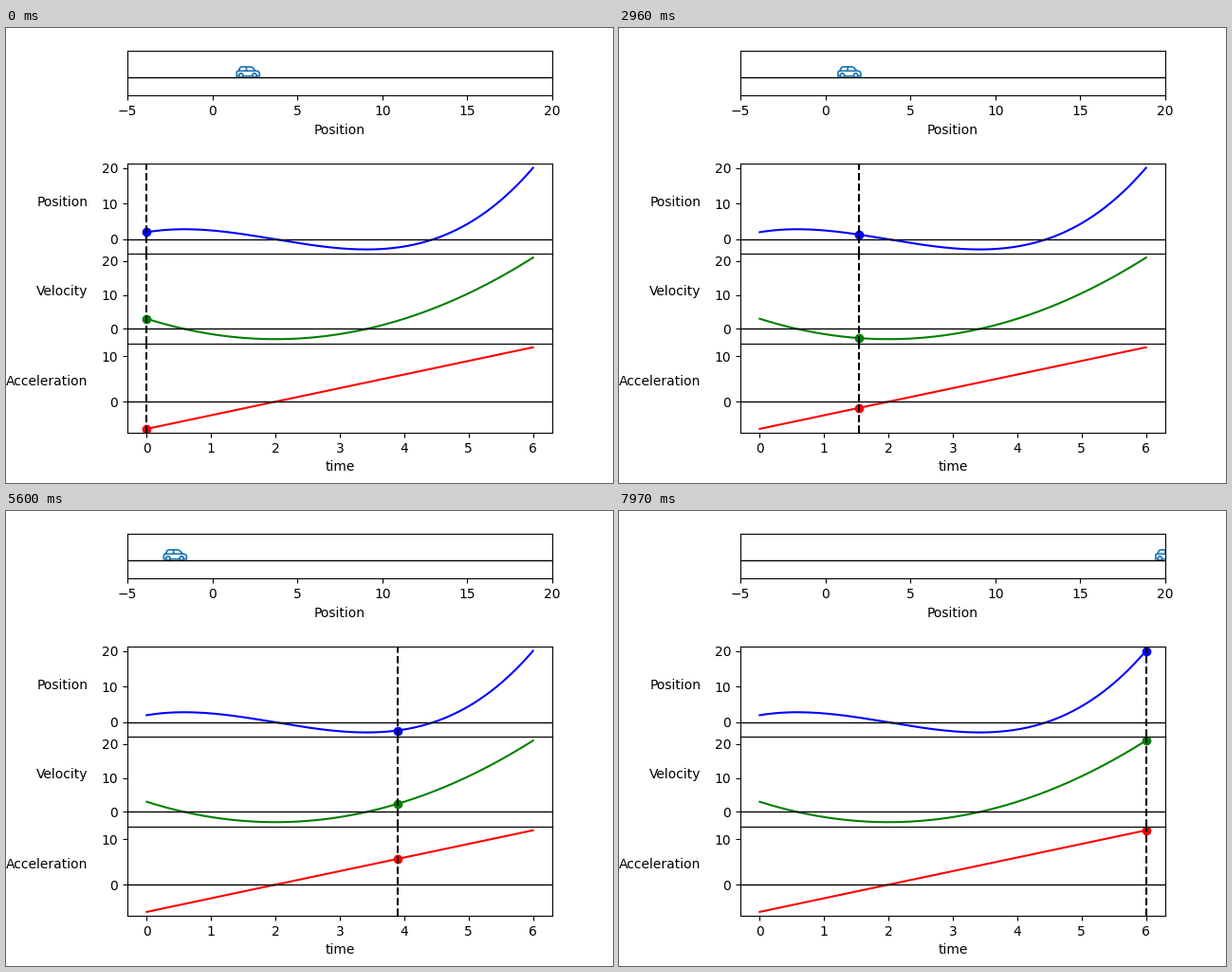
These frames come from a looping animation (640x480 px, 9.22 s). A matplotlib script:

```python
import matplotlib.pyplot as plt
import numpy as np
from matplotlib.animation import FuncAnimation
from matplotlib.patches import PathPatch
from matplotlib.path import Path
from matplotlib.transforms import Affine2D

W, H = 640, 480
STEP_MS, HOLD_MS, POSE_MS, LOOP_MS = 20, 1250, 30, 9220
T_END, POSES = 6, 225


def position(t):
    return 0.5 * t**3 - 3 * t**2 + 3 * t + 2


def velocity(t):
    return 1.5 * t**2 - 6 * t + 3


def acceleration(t):
    return 3 * t - 6


PLOTS = [
    ("Position", position, "b", [0, 10, 20]),
    ("Velocity", velocity, "g", [0, 10, 20]),
    ("Acceleration", acceleration, "r", [0, 10]),
]

plt.rcParams["font.family"] = "DejaVu Sans"
fig = plt.figure(figsize=(W / 100, H / 100), dpi=100)
grid = fig.add_gridspec(5, 1, height_ratios=[1, 1.52, 2, 2, 2], hspace=0,
                        left=0.2, right=0.9, bottom=0.11, top=0.95)
times = np.linspace(0, T_END, POSES + 1)

# Road strip and the three graphs: limits, ticks and labels
road = fig.add_subplot(grid[0])
road.set(xlim=(-5, 20), ylim=(-0.7, 1), yticks=[], xlabel="Position",
         xticks=range(-5, 21, 5))

graphs = []
for row, (name, func, color, ticks) in enumerate(PLOTS, 2):
    ax = fig.add_subplot(grid[row])
    values = func(times)
    pad = 0.05 * np.ptp(values)
    ax.set(xlim=(-0.05 * T_END, 1.05 * T_END), yticks=ticks,
           ylim=(values.min() - pad, values.max() + pad),
           xticks=range(T_END + 1) if row == 4 else [])
    ax.set_ylabel(name, rotation=0, ha="right", labelpad=10)
    graphs.append(ax)
graphs[-1].set_xlabel("time")


def freeze_labels():
    """Render ticks and text once and keep them as still strips, for speed."""
    for ax in fig.axes:
        ax.spines[:].set_visible(False)
    fig.canvas.draw()
    image = np.array(fig.canvas.buffer_rgba())
    for x0, y0, x1, y1 in [(0, 136, 128, 427), (100, 427, 600, 476),
                           (100, 71, 600, 118)]:
        fig.figimage(image[y0:y1, x0:x1], x0, H - y1, zorder=-1)
    for ax in fig.axes:
        ax.spines[:].set_visible(True)
        ax.patch.set_visible(False)
        ax.xaxis.set_visible(False)
        ax.yaxis.set_visible(False)


def car_path():
    """Side view of a car in pixels around its position on the road."""
    m, l, q = Path.MOVETO, Path.LINETO, Path.CURVE3
    body = [
        (m, -8.3, 0.8), (l, -10.2, 0.8), (l, -10.2, 4.5),
        (q, -10.2, 6.2), (q, -8.2, 6.2), (l, -7, 9),
        (q, -6.4, 10.5), (q, -4.6, 10.5), (l, 4, 10.5),
        (q, 6, 10.5), (q, 7.2, 9), (l, 9.5, 6.3),
        (q, 13.7, 6.3), (q, 13.7, 3.5), (l, 13.7, 0.8), (l, 11, 0.8),
        (m, -8.2, 6.2), (l, 9.5, 6.2),
        (m, 0, 6.2), (l, 0, 10.5),
        (m, -3.2, 0.8), (l, 5.8, 0.8),
    ]
    parts = [Path([p[1:] for p in body], [p[0] for p in body])]
    parts += [Path.circle((x, 1.5), 2.1) for x in (-5.7, 8.5)]
    return Path.make_compound_path(*parts)


freeze_labels()

road.axhline(0, color="k", lw=1)
car_shift = Affine2D()
road.add_patch(PathPatch(car_path(), fill=False, ec="C0", lw=1.25,
                         transform=car_shift, zorder=1))

dots, cursors = [], []
for ax, (name, func, color, ticks) in zip(graphs, PLOTS):
    ax.plot(times, func(times), color)
    ax.axhline(0, color="k", lw=1)
    dots.append(ax.scatter([0], [func(0)], c=color))
    cursors.append(ax.axvline(0, color="k", ls="--"))


def draw(frame):
    ms = frame * STEP_MS + STEP_MS // 2
    pose = 0 if ms < HOLD_MS else min(POSES, (ms - HOLD_MS) // POSE_MS + 1)
    t = T_END * pose / POSES
    x = road.transData.transform((position(t), 0))[0]
    car_shift.clear().translate(x, 428.5)
    for dot, cursor, (name, func, color, ticks) in zip(dots, cursors, PLOTS):
        dot.set_offsets([(t, func(t))])
        cursor.set_xdata([t, t])
    return dots + cursors


anim = FuncAnimation(fig, draw, frames=LOOP_MS // STEP_MS, interval=STEP_MS,
                     init_func=lambda: draw(0), repeat=True, repeat_delay=0,
                     cache_frame_data=False)
plt.show()
```
